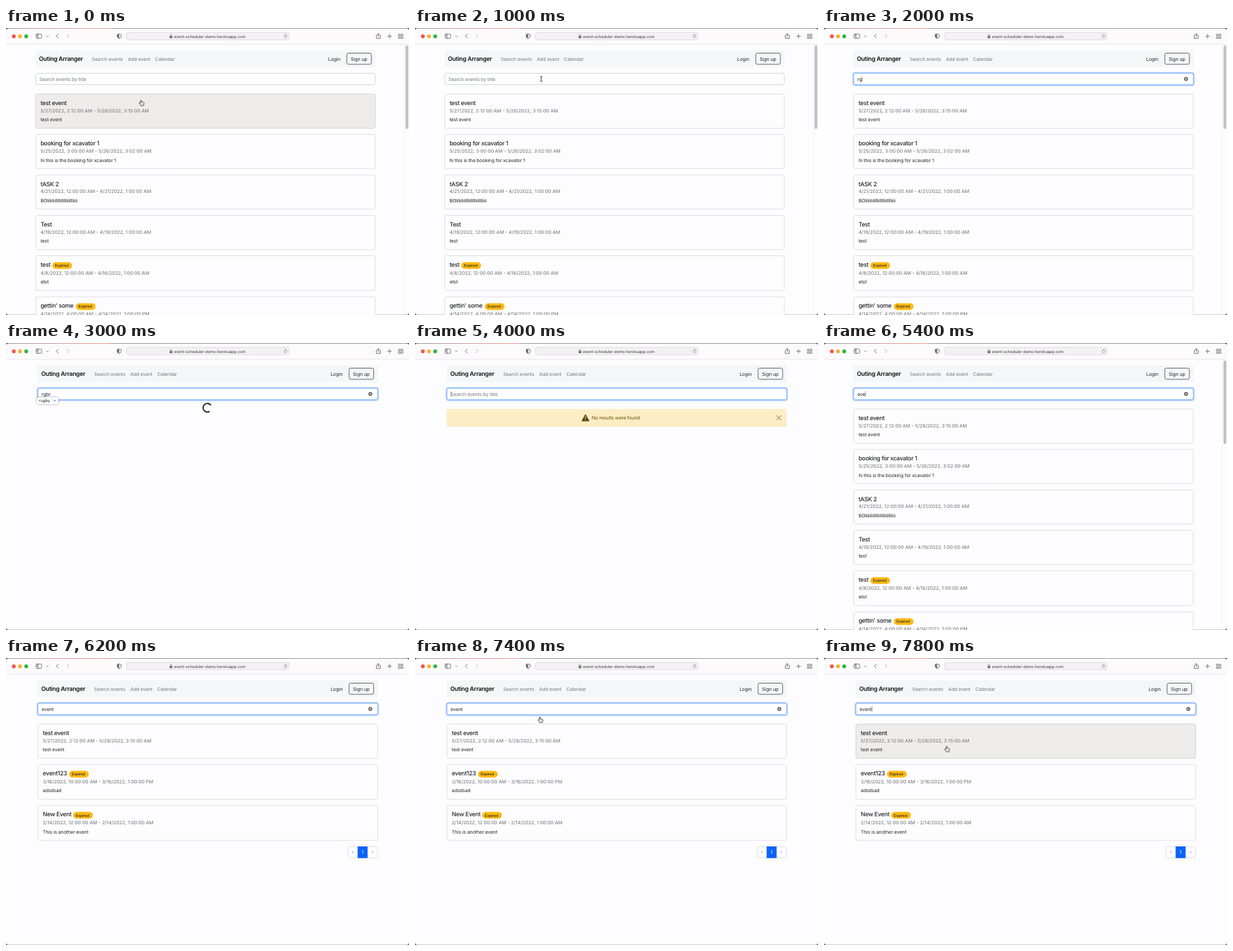
Animation, 600 px wide and 428 px high, one loop 8000 ms. Source, as an HTML page:

```html
<!DOCTYPE html>
<html lang="en">
<head>
<meta charset="utf-8">
<title>Event search</title>
<style>
  html, body { margin: 0; width: 100%; height: 100%; overflow: hidden; background: #fdfcfe; }
  svg { display: block; width: 600px; height: 428px; }
  text { font: 7.1px Inter, "Open Sans", sans-serif; letter-spacing: -.1px; fill: #212529;
         text-rendering: geometricPrecision; white-space: pre; }
  .brand { font-size: 8.9px; font-weight: 600; letter-spacing: -.25px; fill: #111; }
  .title { font-size: 8.85px; font-weight: 500; letter-spacing: -.28px; }
  .date { fill: #6c6f75; letter-spacing: 0; }
  .muted { fill: #77787c; }
  .hint { fill: #74777d; }
  .tag { font-size: 5.5px; font-weight: 500; letter-spacing: 0; }
  .url { font-size: 5.9px; letter-spacing: -.07px; fill: #3c3b3e; }
  .fix { font-size: 6px; letter-spacing: 0; fill: #1c1c1e; }
  .warn { fill: #664d03; }
  .card { fill: #fdfcfe; stroke: #dddce0; stroke-width: .9; }
  .hover { fill: #eeecea; stroke: #d2cfcd; }
  .line { fill: none; stroke: #6d6b70; stroke-width: .9; stroke-linecap: round; stroke-linejoin: round; }
  .bubble { fill: #fff; filter: drop-shadow(0 .8px 1.6px rgba(0, 0, 0, .4)); }
  .off { display: none; }
</style>
</head>
<body>
<svg viewBox="0 0 600 428">
  <linearGradient id="glow"><stop stop-color="#7d4a55"/><stop offset="1" stop-color="#ea5a45"/></linearGradient>
  <rect width="600" height="428" fill="#5f4d62"/>
  <rect x="28" width="127" height="2" fill="url(#glow)"/>
  <rect y=".7" width="600" height="427" rx="4" fill="#fdfcfe"/>
  <path d="M0 24V4.7a4 4 0 0 1 4-4h592a4 4 0 0 1 4 4V24z" fill="#fdfafc"/>
  <path d="M0 24.2h600" stroke="#e3e1e4" stroke-width=".8"/>

  <circle cx="11.7" cy="12.4" r="2.8" fill="#f4544d"/>
  <circle cx="20.9" cy="12.4" r="2.8" fill="#f5b02e"/>
  <circle cx="30.1" cy="12.4" r="2.8" fill="#2ab640"/>
  <g class="line">
    <rect x="44.8" y="9" width="8.2" height="6.4" rx="1.2"/>
    <path d="M47.7 9v6.4M45.9 10.8h.7M45.9 12.3h.7"/>
    <path d="M60.2 11.8l1.4 1.4 1.4-1.4" stroke-width=".8"/>
    <path d="M77.8 9.3l-2.9 2.9 2.9 2.9"/>
    <path d="M90.8 9.3l2.9 2.9-2.9 2.9" stroke="#b9b7bb"/>
    <path d="M168.5 8.9l3 1v2.4q0 2.2-3 3.6q-3-1.4-3-3.6V9.9z"/>
    <path d="M168.5 8.9v7q-3-1.4-3-3.6V9.9z" fill="#6d6b70" stroke="none"/>
    <rect x="179.5" y="6.6" width="242" height="11" rx="2.5" fill="#f3f1f3" stroke="#dedce0"/>
    <rect x="243.6" y="12" width="4" height="3.2" rx=".6" fill="#6d6b70" stroke="none"/>
    <path d="M244.4 12v-1.1a1.2 1.2 0 0 1 2.4 0V12" stroke-width=".7"/>
    <path d="M418 11.4a2.1 2.1 0 1 0 .3 1.3M416.3 9.2l1 1.1-1.1 1" stroke-width=".6"/>
    <path d="M552.6 11h-1.3v4.6h6V11H556M554.3 13.2V8.3M552.7 9.8l1.6-1.6 1.6 1.6"/>
    <path d="M571 9.4v5.8M568.1 12.3h5.8"/>
    <path d="M584.6 9.2h2.4v2.4h-2.4zM588.6 9.2h2.4v2.4h-2.4zM584.6 13.2h2.4v2.4h-2.4zM588.6 13.2h2.4v2.4h-2.4z" stroke-width=".8"/>
  </g>
  <text class="url" x="250" y="14.7">event-scheduler-demo.herokuapp.com</text>

  <g id="scrollbar">
    <path d="M593.2 24.6V427" stroke="#efedf0" stroke-width=".6"/>
    <rect x="594.8" y="26" width="4.2" height="124.5" rx="2.1" fill="#c1c0c2"/>
  </g>

  <g id="page">
    <rect x="44" y="33" width="506" height="25.4" fill="#f5f6f8"/>
    <text class="brand" x="49" y="49.2">Outing Arranger</text>
    <text class="muted" x="127.8" y="48.5">Search events</text>
    <text class="muted" x="181.5" y="48.5">Add event</text>
    <text class="muted" x="221.8" y="48.5">Calendar</text>
    <text x="479.8" y="48.5">Login</text>
    <rect x="507.4" y="37.5" width="36.6" height="16.6" rx="2.4" fill="none" stroke="#35393d" stroke-width=".75"/>
    <text x="513.2" y="48.5">Sign up</text>

    <rect id="ring" x="43.3" y="66.8" width="507.4" height="18.6" rx="3.2" fill="none" stroke="#acccfb" stroke-width="2"/>
    <rect id="box" x="44.2" y="67.7" width="505.6" height="16.8" rx="2.6" fill="#fefefe" stroke-width=".9"/>
    <text id="query" x="49.7" y="78.7"></text>
    <path id="caret" d="M0 72v8" stroke="#555" stroke-width=".6"/>
    <g id="clear">
      <circle cx="539" cy="76" r="3" fill="#6c6b6f"/>
      <path d="M537.9 74.9l2.2 2.2m0-2.2l-2.2 2.2" stroke="#fff" stroke-width=".7"/>
    </g>

    <g id="all"></g>
    <g id="found">
      <rect x="506" y="281.3" width="43.6" height="16.8" rx="2.4" class="card"/>
      <rect x="520.1" y="281" width="14.9" height="17.4" fill="#0b63f6"/>
      <text x="511.6" y="292" class="muted">‹</text>
      <text x="525.9" y="292.3" style="fill:#fff">1</text>
      <text x="540.8" y="292" class="muted">›</text>
    </g>
    <g id="empty">
      <rect x="43.8" y="98.2" width="506" height="26.7" rx="2.4" fill="#fdedc4"/>
      <path d="M250.4 107.3l4.7 8.7h-9.4z" fill="#5c4708" stroke="#5c4708" stroke-width="1.6" stroke-linejoin="round"/>
      <path d="M250.4 109.4v3.4m0 1.4v1" stroke="#fdedc4" stroke-width="1.1"/>
      <text class="warn" x="259.5" y="114.2">No results were found.</text>
      <path class="line" d="M534.9 108.3l6.6 6.6m0-6.6l-6.6 6.6" style="stroke:#6a5a30"/>
    </g>
    <path id="spinner" d="M300.8 92a6.35 6.35 0 1 0 0 9" fill="none" stroke="#212529" stroke-width="1.9"/>
    <g id="fix">
      <rect class="bubble" x="42.5" y="80.9" width="32" height="10.3" rx="2.8"/>
      <text class="fix" x="45.6" y="88">rugby</text>
      <path d="M64.7 82.6v6.8" stroke="#d5d4d8" stroke-width=".6"/>
      <path d="M67.9 84.8l2.4 2.4m0-2.4l-2.4 2.4" stroke="#444" stroke-width=".7"/>
    </g>
  </g>

  <g id="hand">
    <path d="M-1.7-3.4q.8-.9 1.6 0v2.3l2.4.5q1.3.3 1.2 1.6L3 3.1l-.6 1.3h-3.6L-2.9 1.9-3.8.5q.1-1 1.2-.5l.9.8z"
      fill="#fff" stroke="#222" stroke-width=".8" stroke-linejoin="round"/>
    <path d="M.2 1.2v1.7M1.5 1.2v1.7" stroke="#444" stroke-width=".5"/>
  </g>
  <path id="beam" d="M-1.6-3.9q1.4 0 1.6.8q.2-.8 1.6-.8M0-3.1v6.2M-1.6 3.9q1.4 0 1.6-.8q.2.8 1.6.8"
    fill="none" stroke="#222" stroke-width=".9"/>
</svg>
<script>
const LOOP = 8000, STEP = 200;
const $ = id => document.getElementById(id);
const show = (id, on) => $(id).classList.toggle('off', !on);
const put = (id, x, y) => $(id).setAttribute('transform', `translate(${x} ${y})`);

const allEvents = [
  ['test event', '5/27/2022, 2:12:00 AM - 5/28/2022, 3:15:00 AM', 'test event'],
  ['booking for xcavator 1', '5/25/2022, 3:00:00 AM - 5/26/2022, 3:02:00 AM', 'hi this is the booking for xcavator 1'],
  ['tASK 2', '4/21/2022, 12:00:00 AM - 4/21/2022, 1:00:00 AM', 'BOliliiliillllillllliilllliiii'],
  ['Test', '4/19/2022, 12:00:00 AM - 4/19/2022, 1:00:00 AM', 'test'],
  ['test', '4/8/2022, 12:00:00 AM - 4/16/2022, 1:00:00 AM', 'etst', 69],
  ["gettin' some", '4/14/2022, 4:00:00 AM - 4/14/2022, 1:00:00 PM', '', 104]
];
const foundEvents = [
  allEvents[0],
  ['event123', '3/16/2022, 10:00:00 AM - 3/16/2022, 1:00:00 PM', 'adsdsad', 90.5],
  ['New Event', '2/14/2022, 12:00:00 AM - 2/14/2022, 1:00:00 AM', 'This is another event', 96.7]
];

// badgeX marks an expired event, whose card is slightly taller
function cards(events) {
  let y = 98.5;
  return events.map(([title, date, note, badgeX]) => {
    const extra = badgeX ? .9 : 0;
    const badge = badgeX ? `<rect x="${badgeX}" y="${y + 9.5}" width="29.3" height="10" rx="5" fill="#fdb913"/>
      <text class="tag" x="${badgeX + 4}" y="${y + 16.5}">Expired</text>` : '';
    const card = `<rect class="card" x="44.2" y="${y}" width="505.6" height="${51 + extra}" rx="2.4"/>
      <text class="title" x="51.4" y="${y + 16.4}">${title}</text>${badge}
      <text class="date" x="51.4" y="${y + 27.2 + extra}">${date}</text>
      <text x="51.4" y="${y + 40.7 + extra}">${note}</text>`;
    y += 60.3 + extra;
    return card;
  }).join('');
}
$('all').innerHTML = cards(allEvents);
$('found').insertAdjacentHTML('afterbegin', cards(foundEvents));

const views = [[0, 'all'], [2800, 'spinner'], [3800, 'empty'], [4400, 'all'], [6200, 'found']];
const typing = [[0, ''], [1400, ''], [1800, 'r'], [2000, 'rg'], [2200, 'rgb'], [2400, 'rgbr'], [4000, ''],
  [5000, 'e'], [5200, 'ev'], [5400, 'eve'], [5600, 'even'], [5800, 'event']];
const mouse = [[0, 202, 111.5], [200, 200.5, 108], [400, 196, 99], [600, 191, 85], [800, 188.4, 77.5],
  [1000, 188, 76], [1600], [7400, 187, 92], [7600, 184.5, 121], [7800, 183.5, 135.5]];
const at = (list, t) => list.filter(item => item[0] <= t).pop();

function draw(t) {
  const view = at(views, t)[1];
  const [typedAt, text] = at(typing, t);
  const focused = t >= 1400;
  const shift = view === 'all' ? 0 : 3.4;

  ['all', 'spinner', 'empty', 'found'].forEach(id => show(id, id === view));
  show('scrollbar', view === 'all');
  put('page', shift, 0);
  $('spinner').setAttribute('transform', `rotate(${(t - 2975) * .48} 296.3 96.5)`);

  show('ring', focused);
  $('box').setAttribute('stroke', focused ? '#7fb3fa' : '#cfd3d8');
  $('query').textContent = text || 'Search events by title';
  $('query').classList.toggle('hint', !text);
  show('clear', text);
  show('fix', t >= 2600 && t < 3800);
  show('caret', focused && (t - typedAt) % 1000 < 400);
  put('caret', 50.1 + (text ? $('query').getComputedTextLength() : 0), 0);

  const [, x, y] = at(mouse, t);
  const overCard = y > 98 && y < 150;
  const overBox = y > 67 && y < 85;
  show('hand', x && !overBox);
  show('beam', x && overBox);
  if (x) ['hand', 'beam'].forEach(id => put(id, x, y));
  ['all', 'found'].forEach(id => $(id).querySelector('.card').classList.toggle('hover', overCard));
}

function tick(now) {
  draw(Math.floor(now % LOOP / STEP) * STEP);
  requestAnimationFrame(tick);
}
draw(0);
requestAnimationFrame(tick);
</script>
</body>
</html>
```
